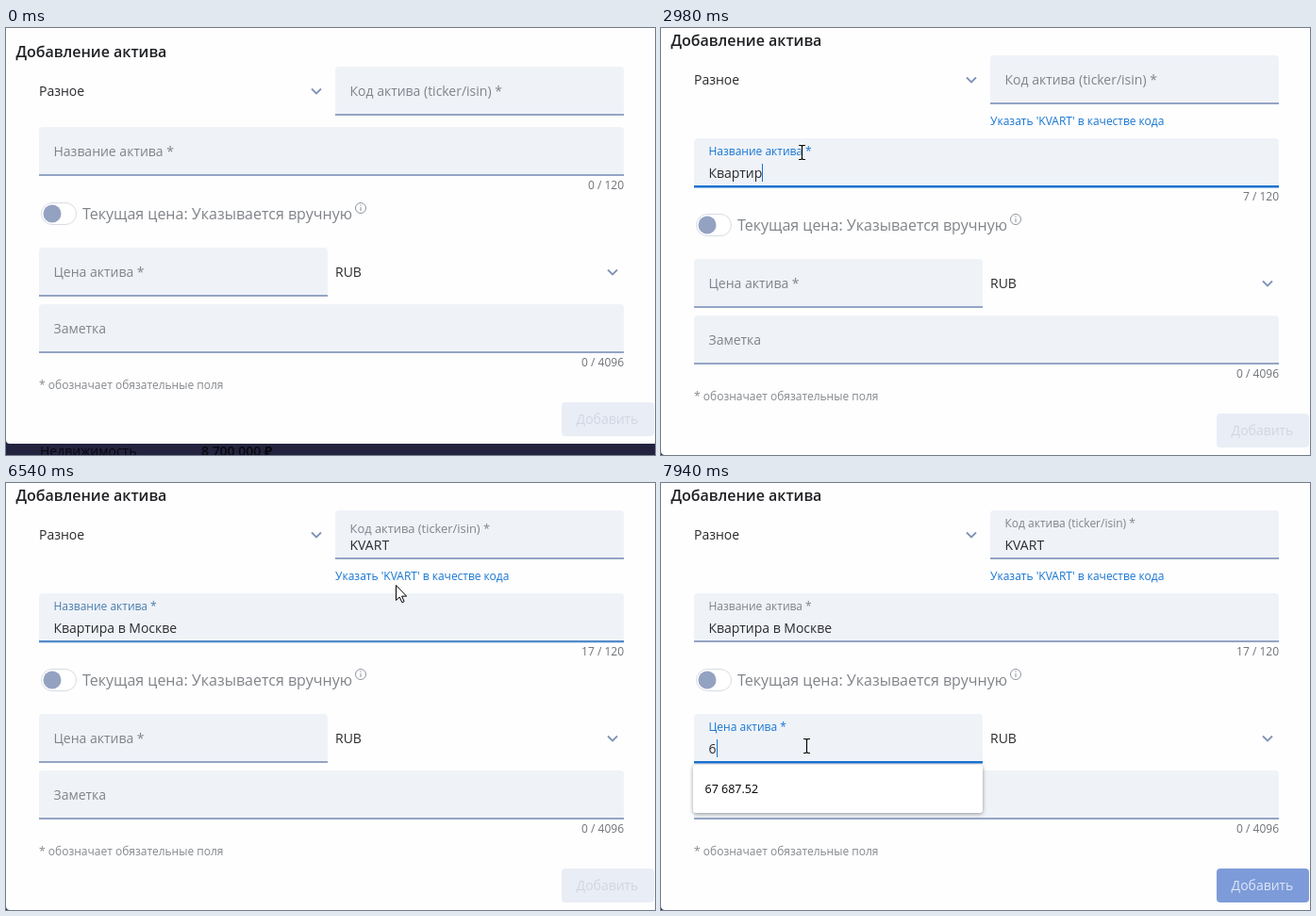
These frames come from a looping animation (688x453 px, 7990 ms). An HTML page:

```html
<!DOCTYPE html>
<html lang="ru">
<head>
<meta charset="utf-8">
<title>Добавление актива</title>
<style>
  html, body { margin: 0; width: 100%; height: 100%; overflow: hidden; background: #23233f; }
  svg { display: block; width: 688px; height: 453px; }
  text { font-family: "Open Sans", "Noto Sans", sans-serif; font-size: 14px; fill: #2b2b2e; white-space: pre; }
  .title { font-size: 16px; font-weight: 600; fill: #1f2024; }
  .small { font-size: 12px; fill: #6f7277; }
  .muted { fill: #808489; }
  .hint { font-size: 12px; fill: #1976d2; }
  .end { text-anchor: end; }
  .mid { text-anchor: middle; }
  .box { fill: #eff3f8; }
  .line { fill: #94a4c4; }
  .active { fill: #1b73d0; }
  .chevron { fill: none; stroke: #7f93b8; stroke-width: 1.8; }
  .popup rect { fill: #fff; filter: drop-shadow(0 1px 2px #0006); }
  .popup text { font-size: 12.5px; fill: #000; }
  .pointer { fill: #fff; stroke: #000; stroke-linejoin: round; }
</style>
</head>
<body>
<svg viewBox="0 0 688 453">
  <rect width="688" height="453" fill="#23233f"/>
  <g id="page">
    <text x="36" y="454" fill="#000" style="fill:#08080f">Недвижимость</text>
    <text x="207" y="454" font-weight="600" style="fill:#08080f">8 700 000 ₽</text>
  </g>
  <rect id="dialog" x="0" y="-20" width="700" height="461" rx="4" fill="#fefefe"/>

  <g id="upper">
    <text class="title" x="10.500" y="31">Добавление актива</text>
    <text x="35" y="72">Разное</text>
    <path class="chevron" d="M324 64.500l5 5 5-5"/>
    <text class="hint" id="hint" x="349" y="115"></text>
  </g>

  <g id="lower">
    <text class="small end" id="count" x="655" y="171"></text>
    <rect x="37.500" y="185.500" width="37" height="23" rx="11.500" fill="#fff" stroke="#d9dce4"/>
    <circle cx="49" cy="197" r="9.500" fill="#94a2c2"/>
    <text class="muted" x="81" y="203" style="font-size:16px">Текущая цена: Указывается вручную</text>
    <circle cx="376" cy="191" r="5.500" fill="none" stroke="#9095a0"/>
    <path d="M376 190v4M376 187.500v1.300" stroke="#8a8f9a"/>
    <text x="349" y="264">RUB</text>
    <path class="chevron" d="M638 256.500l5 5 5-5"/>
    <text class="small end" x="655" y="359">0 / 4096</text>
    <text class="small" x="35" y="383" style="fill:#85888d">* обозначает обязательные поля</text>
    <rect id="button" x="589" y="397" width="98" height="36" rx="4"/>
    <text id="buttonText" class="mid" x="637.500" y="420">Добавить</text>
  </g>

  <g class="popup" id="popup">
    <rect id="popupBox" x="34" y="299" width="307" rx="3"/>
    <text x="46.500" y="329">67 687.52</text>
    <g id="more">
      <text x="46.500" y="361">1 250 000</text>
      <text x="46.500" y="393">8 700 000</text>
      <text x="46.500" y="425">340.15</text>
    </g>
  </g>

  <g id="cursor">
    <g id="ibeam" fill="none">
      <path d="M-3.500-7.500h2.500l1 1 1-1h2.500M0-6.500v13M-3.500 7.500h2.500l1-1 1 1h2.500" stroke="#fff" stroke-width="2.600" opacity=".7"/>
      <path d="M-3.500-7.500h2.500l1 1 1-1h2.500M0-6.500v13M-3.500 7.500h2.500l1-1 1 1h2.500" stroke="#000" stroke-width="1.200"/>
    </g>
    <path id="arrow" class="pointer" d="M.5.5v16l3.700-3.500 2.600 5.700 2.300-1-2.500-5.600h5z"/>
    <path id="hand" class="pointer" d="M-1.500 11V1.500q1.500-2 3 0V7q2-1.500 3 .5 2-1 3 .7 2-.8 2.500 1V14l-2 4.500h-7L-5.500 12q0-2.500 2-2z"/>
  </g>
</svg>
<script>
const LOOP = 7990, SHIFT_AT = 2200, PICK_AT = 6490, PRICE_AT = 7230, PRICE_KEY = 7840;
const NAME = 'Квартира в Москве', CODE = 'KVART';
const KEYS = [2200, 2520, 2570, 2720, 2870, 2920, 2980, 3150, 3270,
  3680, 3800, 4110, 4260, 4290, 4470, 4650, 4770];

// time, x, y
const PATH = [
  [100, 400, 416], [300, 340, 330], [550, 190, 185], [700, 149, 132],
  [5540, 149, 132], [5590, 260, 130], [5640, 520, 140], [5690, 668, 158],
  [5780, 668, 158], [5830, 659, 163], [6160, 428, 107], [6290, 428, 107],
  [6340, 428, 97], [6520, 428, 97], [6870, 183, 276], [7100, 154, 279]
];

const $ = id => document.getElementById(id);
const clamp = v => Math.min(1, Math.max(0, v));
const ease = v => 1 - (1 - clamp(v)) ** 3;
const mix = (a, b, k) => a + (b - a) * k;
const mixColor = (a, b, k) => `rgb(${a.map((v, i) => Math.round(mix(v, b[i], k)))})`;
const show = (el, on) => el.setAttribute('visibility', on ? 'visible' : 'hidden');
const move = (el, x, y) => el.setAttribute('transform', `translate(${x} ${y})`);

function add(parent, tag, attrs) {
  const el = document.createElementNS('http://www.w3.org/2000/svg', tag);
  for (const key in attrs) el.setAttribute(key, attrs[key]);
  parent.append(el);
  return el;
}

function makeField(parent, x, y, width, label) {
  const g = add(parent, 'g', {});
  add(g, 'path', { class: 'box', d: `M${x} ${y + 52}v-48q0-4 4-4h${width - 8}q4 0 4 4v48z` });
  add(g, 'rect', { class: 'line', x, y: y + 50, width, height: 2 });
  const line = add(g, 'rect', { class: 'active', y: y + 50, height: 2.5 });
  const name = add(g, 'text', { x: x + 15.5 });
  name.textContent = label;
  const value = add(g, 'text', { x: x + 15.5, y: y + 42 });
  const caret = add(g, 'rect', { class: 'active', y: y + 27, width: 1, height: 19 });

  return ({ text = '', raise = 0, focus = 0, grow = 1, blink = false }) => {
    name.setAttribute('y', mix(y + 31, y + 18, raise));
    name.style.fontSize = mix(14, 12, raise) + 'px';
    name.style.fill = mixColor([128, 132, 137], [25, 118, 210], focus);
    line.setAttribute('x', x + width * (1 - grow) / 2);
    line.setAttribute('width', width * grow);
    line.setAttribute('opacity', focus);
    if (value.textContent !== text) value.textContent = text;
    caret.setAttribute('x', x + 16 + Math.floor(text ? value.getComputedTextLength() : 0));
    show(caret, blink);
  };
}

const codeField = makeField($('upper'), 349, 41, 306, 'Код актива (ticker/isin) *');
const nameField = makeField($('lower'), 35, 105, 620, 'Название актива *');
const priceField = makeField($('lower'), 35, 233, 306, 'Цена актива *');
makeField($('lower'), 35, 293, 620, 'Заметка')({});

function cursorAt(t) {
  const i = PATH.findIndex(p => p[0] > t);
  if (i < 0) return PATH.at(-1).slice(1);
  if (i === 0) return PATH[0].slice(1);
  const [t0, x0, y0] = PATH[i - 1], [t1, x1, y1] = PATH[i];
  const k = (t - t0) / (t1 - t0);
  return [mix(x0, x1, k), mix(y0, y1, k)];
}

function drawCursor(t, dy) {
  const [x, y] = cursorAt(t);
  const inside = (l, top, r) => x >= l && x <= r && y >= top && y <= top + 52;
  const typing = inside(349, 41 - dy, 655) || inside(35, 105 + dy, 655) ||
    inside(35, 233 + dy, 341) || inside(35, 293 + dy, 655);
  const link = dy > 0 && x >= 349 && x <= 533 && y >= 92 && y <= 105;
  const kind = typing ? 'ibeam' : link ? 'hand' : 'arrow';
  for (const id of ['ibeam', 'hand', 'arrow']) show($(id), t >= 100 && id === kind);
  move($('cursor'), Math.round(x) + (typing ? .5 : 0), Math.round(y));
}

function render(t) {
  const dy = t >= SHIFT_AT ? 12 : 0;
  move($('upper'), 0, -dy);
  move($('lower'), 0, dy);
  move($('dialog'), 0, dy);

  const typed = KEYS.filter(k => k <= t).length;
  const picked = t >= PICK_AT;
  $('count').textContent = `${typed} / 120`;
  $('hint').textContent = typed ? `Указать '${CODE.slice(0, typed)}' в качестве кода` : '';
  $('hint').setAttribute('opacity', clamp(.4 + (t - SHIFT_AT) / 200));

  const nameIn = ease((t - 750) / 220);
  nameField({
    text: NAME.slice(0, typed),
    raise: nameIn,
    focus: nameIn * (1 - ease((t - PICK_AT) / 250)),
    grow: mix(.5, 1, nameIn),
    blink: t >= 850 && !picked && !(t >= 1110 && t < 1690) &&
      !(t >= 5260 && t < 5830) && t < 6340
  });

  codeField({ text: picked ? CODE : '', raise: ease((t - PICK_AT) / 220) });

  const priceIn = ease((t - PRICE_AT) / 230);
  const priced = t >= PRICE_KEY;
  priceField({
    text: priced ? '6' : '',
    raise: priceIn,
    focus: priceIn,
    grow: mix(.5, 1, priceIn),
    blink: t >= 7280 && (t < 7640 || priced)
  });

  show($('popup'), t >= 7280);
  show($('more'), t >= 7280 && !priced);
  $('popupBox').setAttribute('height', priced ? 51 : 153);

  const ready = clamp((t - PRICE_KEY + 30) / 130);
  $('button').style.fill = mixColor([233, 237, 246], [125, 155, 217], ready);
  $('buttonText').style.fill = mixColor([208, 214, 226], [222, 231, 247], ready);

  drawCursor(t, dy);
}

const start = performance.now();
function tick() {
  render((performance.now() - start) % LOOP);
  requestAnimationFrame(tick);
}
tick();
</script>
</body>
</html>
```
